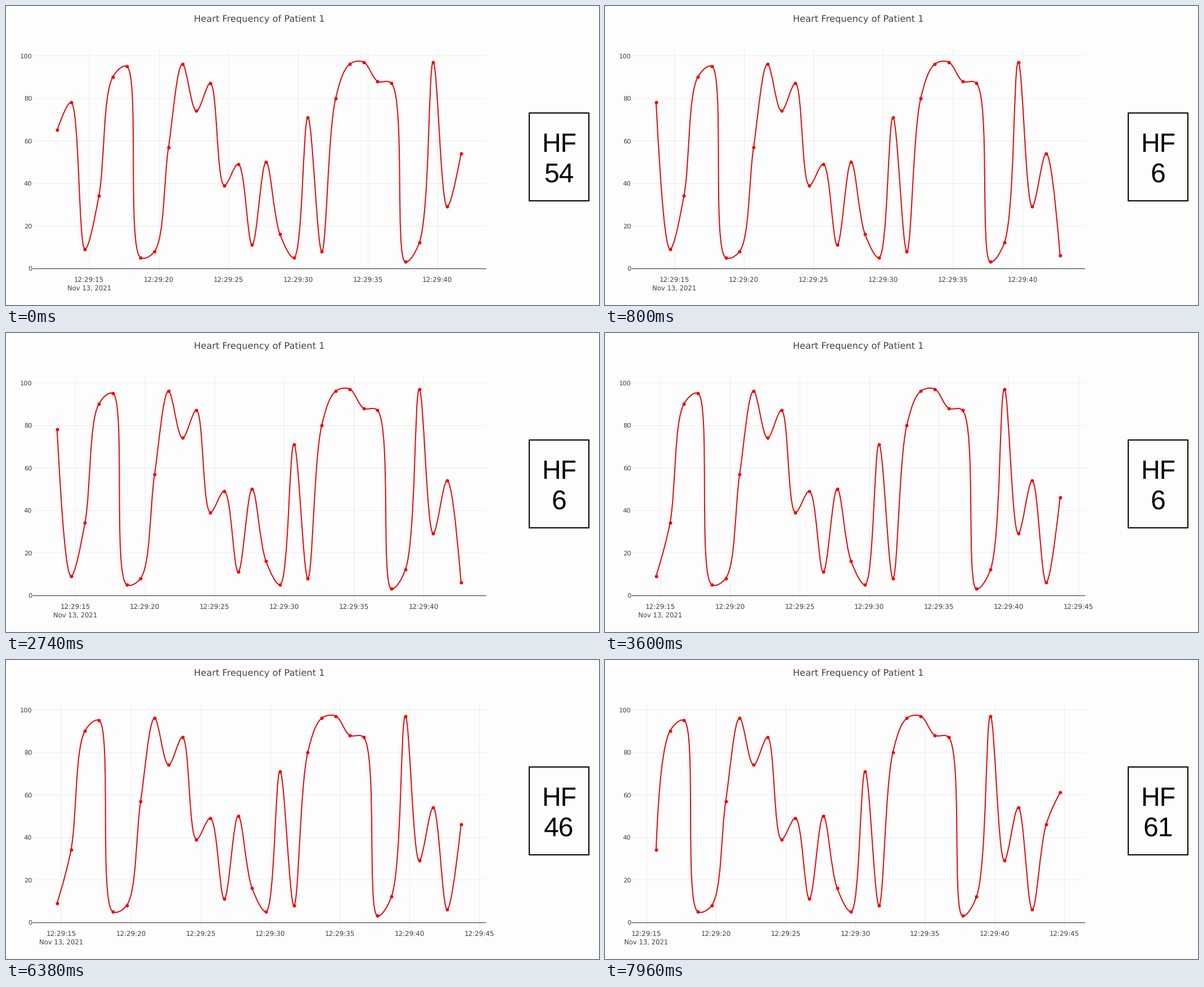
A matplotlib script that plays this animation: 1054x531 px, repeating every 8000 ms.

```python
import numpy as np
import matplotlib.pyplot as plt
from matplotlib.animation import FuncAnimation
from matplotlib.patches import PathPatch, Rectangle
from matplotlib.path import Path

W, H, DPI = 1054, 531, 64
PT = 72 / DPI                      # points per pixel
LOOP, STEP = 8000, 40              # ms
SHIFTS = (520, 3520, 6520)         # the chart moves on by one reading
READOUT_DELAY = 120                # the number box follows a little later

VALUES = [65, 78, 9, 34, 90, 95, 5, 8, 57, 96, 74, 87, 39, 49, 11, 50, 16,
          5, 71, 8, 80, 96, 97, 88, 87, 3, 12, 97, 29, 54, 6, 46, 61]
WINDOW = 30
LEFT, RIGHT, TOP, BOTTOM = 47, 853, 76, 477
FIRST_X, DX = 90.8, 24.76
TICK_X = 147.8                     # 12:29:15 before the first shift
INK, GRID = "#444444", "#ececea"
LINE, DOT = "#e20a0a", "#f20000"

plt.rcParams["text.hinting"] = "none"
fig = plt.figure(figsize=(W / DPI, H / DPI), dpi=DPI, facecolor="#fdfdfd")
ax = fig.add_axes([0, 0, 1, 1])
ax.set(xlim=(0, W), ylim=(H, 0))
ax.axis("off")


def value_y(value):
    return 465.8 - 3.776 * np.asarray(value, dtype=float)


def label(x, y, text, size, ha="center", font="DejaVu Sans", color=INK):
    return ax.text(x, y, text, fontsize=size * PT, ha=ha, va="baseline",
                   family=font, color=color)


def rule(xs, ys, color, width=1, z=1):
    return ax.plot(xs, ys, color=color, lw=width * PT, zorder=z,
                   solid_capstyle="butt")[0]


def controls(before, here, after):
    """Centripetal Catmull-Rom handles on both sides of a point."""
    d1, d2 = before - here, after - here
    a1, a2 = np.hypot(*d1) ** 0.5, np.hypot(*d2) ** 0.5
    num = a2 ** 2 * d1 - a1 ** 2 * d2
    return (here + num / (3 * a2 * (a1 + a2)),
            here - num / (3 * a1 * (a1 + a2)))


def spline(points):
    handles = [controls(*points[i - 1:i + 2])
               for i in range(1, len(points) - 1)]
    verts = [points[0], handles[0][0], points[1]]
    codes = [Path.MOVETO, Path.CURVE3, Path.CURVE3]
    for (_, out), (into, _), end in zip(handles, handles[1:], points[2:]):
        verts += [out, into, end]
        codes += [Path.CURVE4] * 3
    verts += [handles[-1][1], points[-1]]
    codes += [Path.CURVE3] * 2
    return Path(verts, codes)


def window_points(shift):
    xs = FIRST_X + DX * np.arange(WINDOW)
    return np.column_stack([xs, value_y(VALUES[shift:shift + WINDOW])])


# Fixed parts
label(449.8, 28, "Heart Frequency of Patient 1", 16.2)
for v in range(0, 101, 20):
    y = float(value_y(v))
    if v:
        rule([LEFT, RIGHT], [y, y], GRID)
    label(46.3, y + 4.3, str(v), 11.4, ha="right")
rule([LEFT, RIGHT], [465.8, 465.8], INK, 1.2, z=2)
rule([0, W], [530.5, 530.5], "#b0b0b0")
ax.add_patch(Rectangle((930, 189.5), 106, 156, fill=False, ec="black",
                       lw=2 * PT))
label(983, 258.7, "HF", 46.5, font="Liberation Sans", color="black")

# Moving parts
ticks = [(rule([0, 0], [TOP, BOTTOM], GRID),
          label(0, 491.2, f"12:29:{s}", 11.9)) for s in range(15, 50, 5)]
date = label(0, 506, "Nov 13, 2021", 11.6)
curve = ax.add_patch(PathPatch(spline(window_points(0)), fill=False, ec=LINE,
                               lw=2 * PT, zorder=3))
dots, = ax.plot([], [], "o", color=DOT, ms=6 * PT, mew=0, zorder=4)
readout = label(983, 312.7, "", 48, font="Liberation Sans", color="black")


def update(frame):
    now = frame * STEP
    shift = sum(now >= t for t in SHIFTS)
    reading = sum(now >= t + READOUT_DELAY for t in SHIFTS)
    points = window_points(shift)
    curve.set_path(spline(points))
    dots.set_data(points[:, 0], points[:, 1])
    origin = TICK_X - DX * shift
    for i, (line, text) in enumerate(ticks):
        x = origin + 5 * DX * i
        line.set_xdata([x, x])
        text.set_x(x)
        for part in (line, text):
            part.set_visible(x < RIGHT)
    date.set_x(origin)
    readout.set_text(str(VALUES[WINDOW - 1 + reading]))
    return []


anim = FuncAnimation(fig, update, frames=LOOP // STEP, interval=STEP,
                     init_func=lambda: update(0), repeat=True, repeat_delay=0,
                     blit=False)
plt.show()
```
